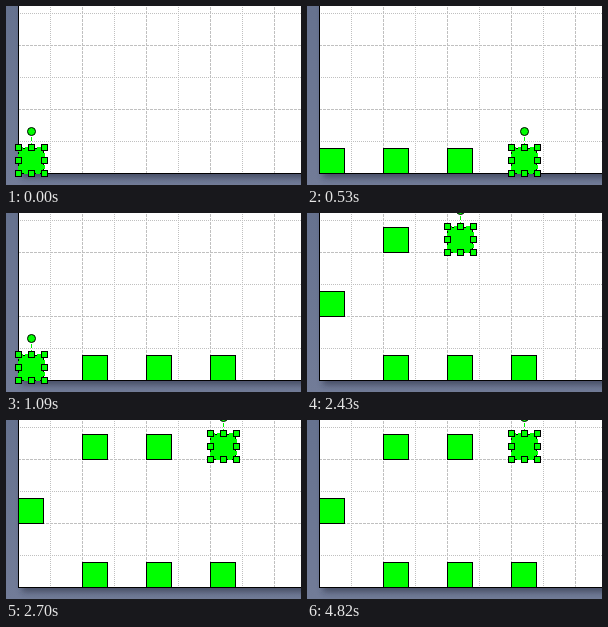
Recreate the animation shown at these times as an HTML page. Size 295 px wide and 179 px high, loop 5530 ms.

```html
<!DOCTYPE html>
<html lang="en">
<head>
<meta charset="utf-8">
<title>Squares on a grid</title>
<style>
html, body { margin: 0; width: 100%; height: 100%; overflow: hidden; }
svg { display: block; width: 295px; height: 179px; }
</style>
</head>
<body>
<svg viewBox="0 0 295 179" shape-rendering="crispEdges">
  <defs>
    <linearGradient id="desk" x1="0" y1="0" x2="0" y2="1">
      <stop offset="0" stop-color="#66728f"/>
      <stop offset="1" stop-color="#727c98"/>
    </linearGradient>
    <filter id="soft" filterUnits="userSpaceOnUse" x="-20" y="-40" width="380" height="240">
      <feGaussianBlur stdDeviation="3"/>
    </filter>
  </defs>
  <rect width="295" height="179" fill="url(#desk)"/>
  <rect x="16" y="-30" width="320" height="202" fill="#1c2436" opacity=".5" filter="url(#soft)"/>
  <rect x="12" y="-5" width="300" height="173" fill="#fff"/>
  <g id="grid" stroke="#c0c0c0"></g>
  <path d="M12.5 0V167.5H295" fill="none" stroke="#000"/>
  <g id="squares" fill="#0f0" stroke="#000"></g>
  <g id="selection"></g>
  <g id="pointer" visibility="hidden">
    <path d="M292 129h1v1h1v1h1v12h-1v1h-1v2h-1z" fill="#000"/>
    <path d="M293 131h1v1h1v11h-1v1h-1z" fill="#fff"/>
  </g>
</svg>
<script>
const LOOP = 5530, SIZE = 25, LOW = 141, MID = 77, TOP = 13;
const cols = [12, 76, 140, 204];
const get = id => document.getElementById(id);

function add(parent, tag, attrs) {
  const el = document.createElementNS('http://www.w3.org/2000/svg', tag);
  for (const key in attrs) el.setAttribute(key, attrs[key]);
  parent.appendChild(el);
  return el;
}

// Lines start at the page's lower left corner, so the dashes do too
function buildGrid() {
  const g = get('grid');
  for (let i = 1; i <= 8; i++) {
    const dash = i % 2 ? '1 1' : '3 1';
    add(g, 'path', { d: `M${12.5 + 32 * i} 168V0`, 'stroke-dasharray': dash });
    if (i <= 5) add(g, 'path', { d: `M12 ${167.5 - 32 * i}H295`, 'stroke-dasharray': dash });
  }
}

function buildSelection() {
  const g = get('selection');
  add(g, 'rect', { x: 1, y: 1, width: SIZE, height: SIZE, fill: 'none',
    stroke: '#0f0', 'stroke-width': 2, 'stroke-dasharray': '4 2' });
  add(g, 'path', { d: 'M13.5 0V-11', stroke: '#0f0', 'stroke-dasharray': '4 2' });
  for (const x of [0, 13, 26])
    for (const y of [0, 13, 26])
      if (x !== 13 || y !== 13)
        add(g, 'rect', { x: x - 2.5, y: y - 2.5, width: 6, height: 6,
          fill: '#0f0', stroke: '#000' });
  add(g, 'circle', { cx: 13.5, cy: -15.5, r: 4, fill: '#0f0', stroke: '#000',
    'shape-rendering': 'auto' });
}

// Each square: column, row, time it appears, time it leaves
const squares = [
  [0, LOW, 0, 1340], [1, LOW, 250, LOOP], [2, LOW, 530, LOOP], [3, LOW, 530, LOOP],
  [0, MID, 1340, LOOP], [1, TOP, 2430, LOOP], [2, TOP, 2430, LOOP], [3, TOP, 2700, LOOP]
].map(([col, y, from, to]) => ({
  from, to,
  el: add(get('squares'), 'rect', { x: cols[col] + 0.5, y: y + 1.5, width: SIZE, height: SIZE })
}));

// Start time, column and row of the selected square
const picks = [
  [0, 0, LOW], [250, 1, LOW], [530, 3, LOW], [1090, 0, LOW],
  [1340, 0, MID], [2430, 2, TOP], [2700, 3, TOP]
];

function show(el, on) {
  el.setAttribute('visibility', on ? 'visible' : 'hidden');
}

function draw(t) {
  for (const s of squares) show(s.el, t >= s.from && t < s.to);
  const [, col, y] = picks.filter(p => p[0] <= t).pop();
  get('selection').setAttribute('transform', `translate(${cols[col]} ${y})`);
  show(get('pointer'), t >= 4540 && t < 4820);
}

buildGrid();
buildSelection();
draw(0);

const start = performance.now();
function tick() {
  draw((performance.now() - start) % LOOP);
  requestAnimationFrame(tick);
}
requestAnimationFrame(tick);
</script>
</body>
</html>
```
